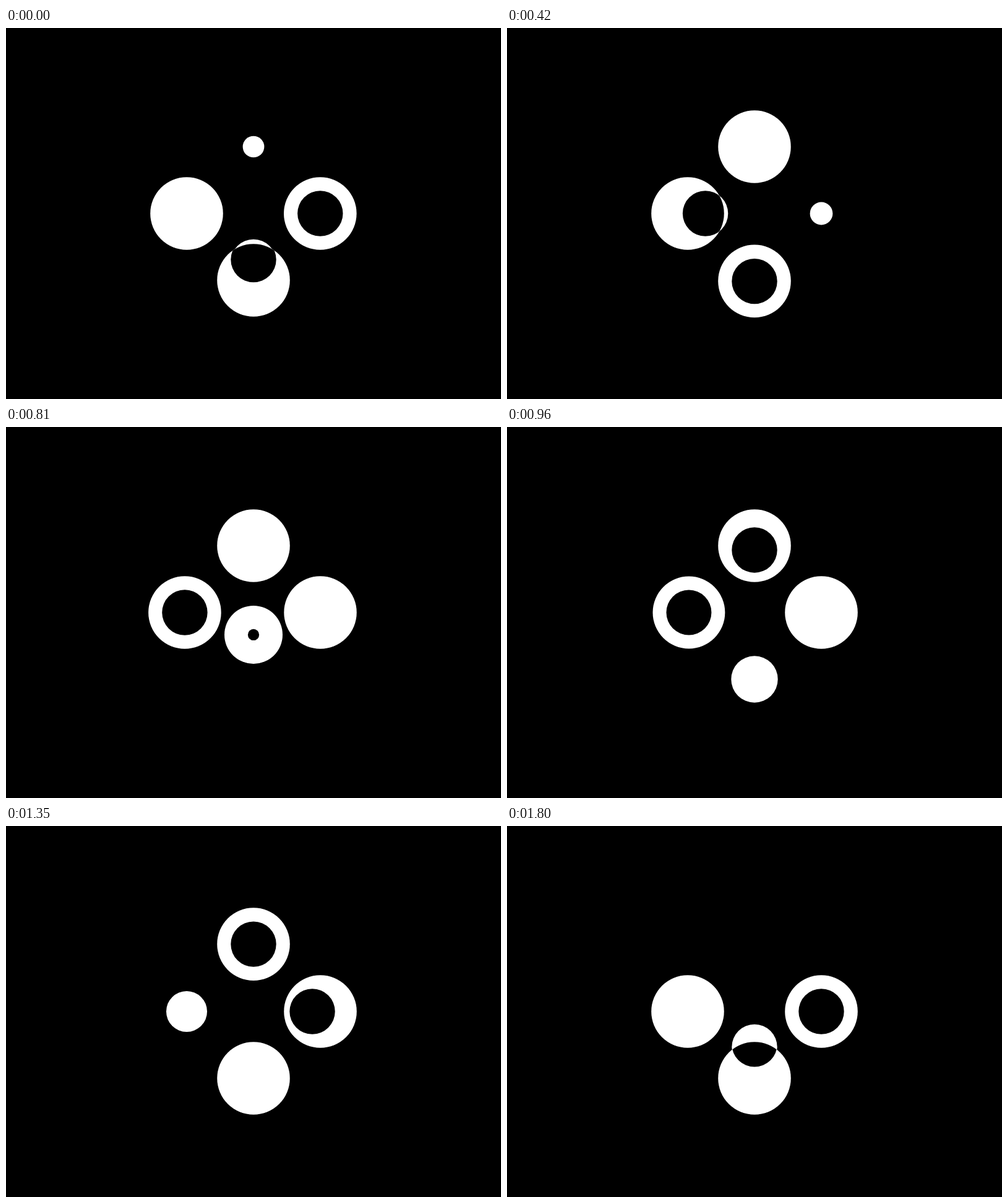
Write an HTML page with a canvas that moves like this. It is 800 px wide and 600 px high and loops after 1.83 s.

```html
<!DOCTYPE html>
<html lang="en">
<head>
<meta charset="utf-8">
<title>Four circles</title>
<style>
html, body { margin: 0; width: 100%; height: 100%; overflow: hidden; background: #000; }
canvas { display: block; }
</style>
</head>
<body>
<canvas id="stage" width="800" height="600"></canvas>
<script>
const ctx = document.getElementById('stage').getContext('2d');
const STEP = 30, STEPS = 61;            // ms per step, steps per loop
const REACH = 108, CROSS = 2 * REACH;   // centre to place, place to opposite place
const DISC = 58.8, BALL = 36.7;         // radii
const OVERSHOOT = 21.7, LEAD = 4;
const PEAK = 16.5, SETTLED = 27;        // steps into a jump

const span = (t, from, to) => Math.min(Math.max((t - from) / (to - from), 0), 1);
const ease = p => p < 0.5 ? 2 * p * p : 1 - 2 * (1 - p) ** 2;
const mix = (a, b, p) => a + (b - a) * p;

// Distance covered: cubic start, quadratic braking past the goal, eased return.
function travel(t) {
  const far = CROSS + OVERSHOOT;
  if (t > PEAK) return mix(far, CROSS, ease(span(t, PEAK, SETTLED)));
  const rise = 0.0417 * Math.max(t + 4.5, 0) ** 3;
  const brake = far - 1.79 * (PEAK - t) ** 2;
  return mix(rise, brake, ease(span(t, 7.5, 10)));
}

// The ring tightens, then closes up into a ball.
const outer = t => mix(mix(DISC, 47, span(t, -2, 4) ** 2), BALL, ease(span(t, 7.5, 10.2)));
const inner = t => BALL * (1 - span(t, -3, 8.55) ** 3);
const regrow = t => DISC * (1 - Math.exp(-0.5 * Math.max(t - 10.45, 0)));

// Each axis alternates two opposite jumps; turn is in quarter turns,
// delay is how far the hole trails the ball in time.
const axes = [
  [{ start: -11.15, turn: 1, delay: 0.2 }, { start: 19.5, turn: 3, delay: 0 }],
  [{ start: 2.8, turn: 2, delay: 0 }, { start: 32.9, turn: 0, delay: 0 }]
];

function trace(x, r) {
  ctx.beginPath();
  ctx.arc(x, 0, r, 0, 2 * Math.PI);
}

function dot(x, r, color) {
  trace(x, r);
  ctx.fillStyle = color;
  ctx.fill();
}

function drawJump({ turn, delay }, t) {
  const x = travel(t) - REACH;
  const goal = Math.max(REACH, x);

  ctx.save();
  ctx.translate(400, 300);
  ctx.rotate(turn * Math.PI / 2);
  dot(-REACH, regrow(t), '#fff');
  dot(x, outer(t), '#fff');
  dot(x, inner(t), '#000');
  dot(goal, DISC, '#fff');
  trace(goal, DISC);
  ctx.clip();
  dot(travel(t - delay) - REACH, outer(t), '#000');
  ctx.restore();
}

function draw(step) {
  ctx.fillStyle = '#000';
  ctx.fillRect(0, 0, 800, 600);
  const age = jump => (step - jump.start + LEAD + STEPS) % STEPS - LEAD;
  for (const [a, b] of axes) {
    const jump = age(a) < age(b) ? a : b;
    drawJump(jump, age(jump));
  }
}

const begin = performance.now();
function tick() {
  draw(Math.floor((performance.now() - begin) / STEP) % STEPS);
  requestAnimationFrame(tick);
}
tick();
</script>
</body>
</html>
```
